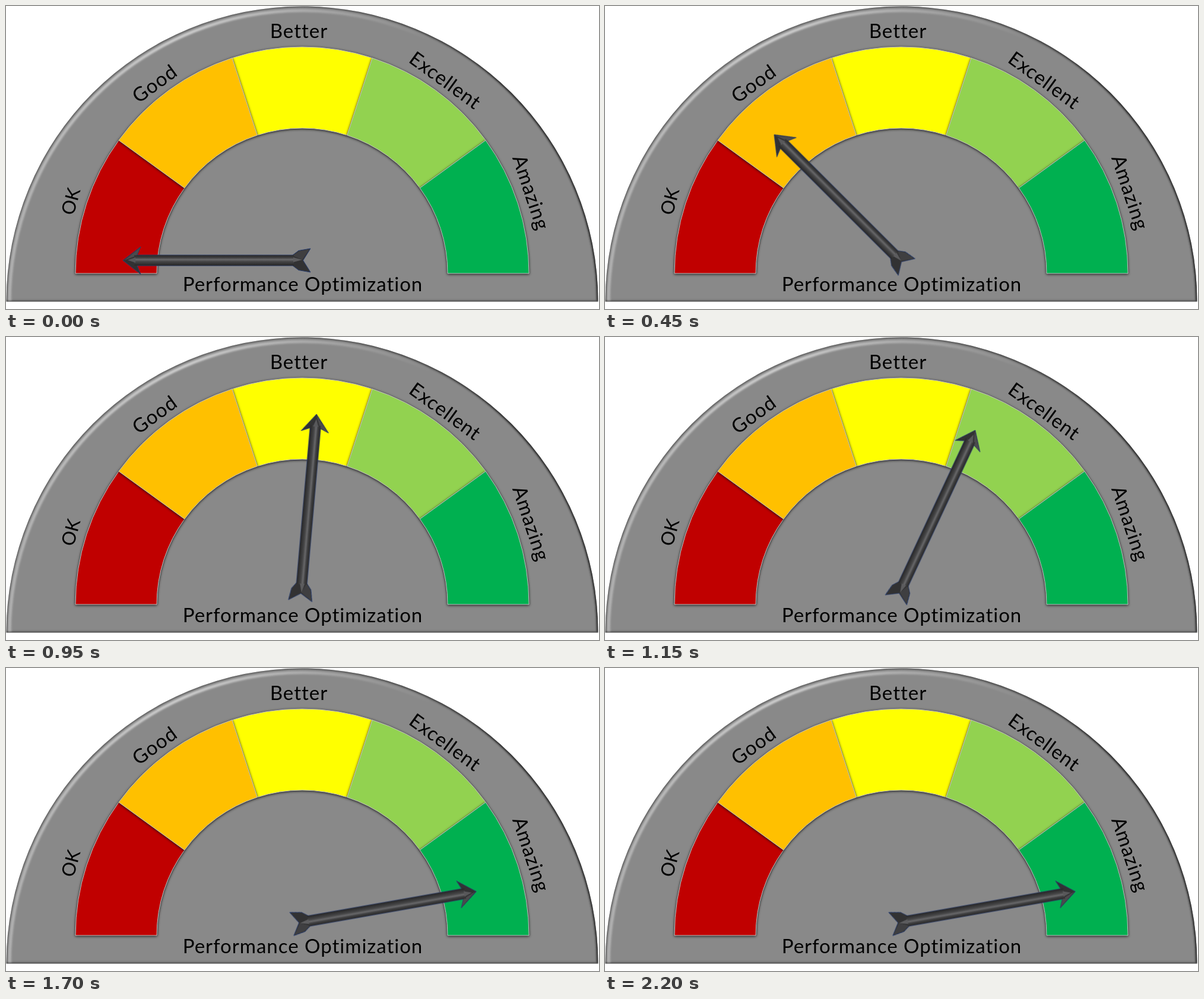
An HTML page for the animation above (2500 ms loop, 999 by 511 pixels).

```html
<!DOCTYPE html>
<html lang="en">
<head>
<meta charset="utf-8">
<title>Performance gauge</title>
<style>
  html, body { margin: 0; width: 100%; height: 100%; overflow: hidden; background: #fff; }
  svg { display: block; width: 999px; height: 511px; }
  text { font: 33px Lato, "Open Sans", sans-serif; letter-spacing: 1px; text-anchor: middle; }
  .short { font-size: 31px; letter-spacing: 0; }
  .segment { stroke: #c4c4c4; stroke-width: 1; filter: drop-shadow(0 1.5px 2px rgba(0, 0, 0, .85)); }
  #needle { transform-origin: 497px 429px; animation: swing 2500ms infinite; }

  /* 5 degrees every 50 ms, then a short wobble before resting */
  @keyframes swing {
    0%   { transform: rotate(0deg);   animation-timing-function: steps(36, end); }
    72%  { transform: rotate(180deg); animation-timing-function: steps(3, end); }
    78%  { transform: rotate(165deg); animation-timing-function: steps(2, end); }
    82%  { transform: rotate(175deg); animation-timing-function: steps(2, end); }
    86%  { transform: rotate(165deg); animation-timing-function: steps(1, end); }
    88%, 100% { transform: rotate(170deg); }
  }
</style>
</head>
<body>
<svg viewBox="0 0 999 511">
  <defs>
    <path id="dome" d="M.5 498.5A498.5 498 0 0 1 997.5 498.5Z"/>
    <clipPath id="inside"><use href="#dome"/></clipPath>
    <filter id="soft" filterUnits="userSpaceOnUse" x="-10" y="-10" width="1020" height="530">
      <feGaussianBlur stdDeviation="1.5"/>
    </filter>
    <linearGradient id="light">
      <stop offset="0" stop-color="#fff" stop-opacity=".35"/>
      <stop offset=".3" stop-color="#fff" stop-opacity=".6"/>
      <stop offset=".72" stop-color="#fff" stop-opacity="0"/>
    </linearGradient>
    <linearGradient id="dark">
      <stop offset="0" stop-color="#444" stop-opacity=".6"/>
      <stop offset=".5" stop-color="#444" stop-opacity=".5"/>
      <stop offset=".85" stop-color="#222" stop-opacity=".95"/>
    </linearGradient>
    <linearGradient id="shaft" x1="0" y1="0" x2="0" y2="1">
      <stop offset="0" stop-color="#2b2b2c"/>
      <stop offset=".22" stop-color="#3c3c3d"/>
      <stop offset=".42" stop-color="#68686a"/>
      <stop offset=".6" stop-color="#474748"/>
      <stop offset="1" stop-color="#272728"/>
    </linearGradient>
  </defs>

  <use href="#dome" fill="#898989"/>
  <g clip-path="url(#inside)" fill="none" filter="url(#soft)">
    <path d="M6 500A493 492.5 0 0 1 992 500" stroke="url(#light)" stroke-width="5"/>
    <path d="M.5 498.5A498.5 498 0 0 1 997.5 498.5" stroke="url(#dark)" stroke-width="5"/>
    <path d="M0 498.5H998" stroke="#4c4c4c" stroke-width="4"/>
  </g>

  <g id="ring"></g>

  <text x="493.5" y="53.5">Better</text>
  <text y="11.5" transform="translate(250.5 131) rotate(-36)">Good</text>
  <text class="short" y="11" transform="translate(109 329.5) rotate(-75)">OK</text>
  <text y="11.5" transform="translate(740 125.5) rotate(36)">Excellent</text>
  <text y="11.5" transform="translate(884.5 314.5) rotate(71.5)">Amazing</text>
  <text x="500" y="481">Performance Optimization</text>

  <g id="needle">
    <path d="M197 429L227 406L221 420H483L493 412.5L513 409L500.5 429L513 449L493 445.5L483 438H221L227 452.5Z"
          fill="#323233" stroke="#2a3f70" stroke-width="1"/>
    <path d="M199 429L226 407.5L220 421Z" fill="#4b4b4d"/>
    <path d="M483 421L494 413.5L511 410.5L499 428Z" fill="#3f3f41"/>
    <rect x="216" y="420.5" width="269" height="17" fill="url(#shaft)"/>
    <path d="M205 428.5L218 424V433Z" fill="#58585a"/>
    <path d="M484 424L499 428L484 432Z" fill="#5c5c5e"/>
  </g>
</svg>
<script>
  const ring = document.getElementById("ring");
  const colors = ["#c00000", "#ffc000", "#ffff00", "#92d250", "#00b050"];
  const paintOrder = [2, 0, 3, 4, 1];

  function point(radius, step) {
    const angle = step * Math.PI / 5;
    return `${499 - radius * Math.cos(angle)} ${451 - radius * Math.sin(angle)}`;
  }

  for (const i of paintOrder) {
    const path = document.createElementNS("http://www.w3.org/2000/svg", "path");
    path.setAttribute("class", "segment");
    path.setAttribute("fill", colors[i]);
    path.setAttribute("d", `M${point(382, i)}A382 382 0 0 1 ${point(382, i + 1)}` +
      `L${point(245, i + 1)}A245 245 0 0 0 ${point(245, i)}Z`);
    ring.append(path);
  }
</script>
</body>
</html>
```
